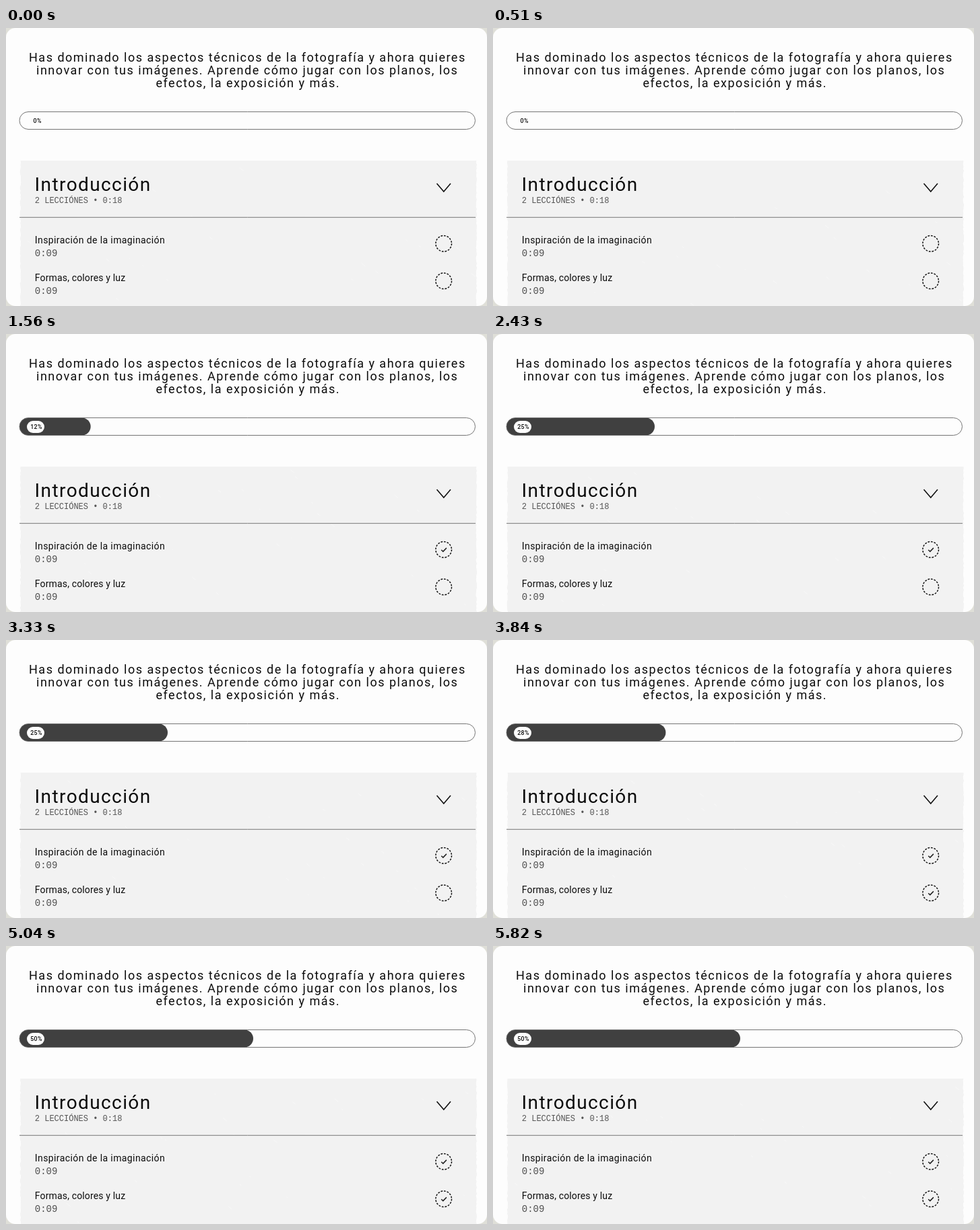
An HTML page with a canvas for the animation above (5.85 s loop, 714x413 px).

```html
<!DOCTYPE html>
<html lang="es">
<head>
<meta charset="utf-8">
<title>Progreso del curso</title>
<style>
html, body { margin: 0; width: 100%; height: 100%; overflow: hidden; background: #dfdfd8; }
canvas { display: block; width: 714px; height: 413px; }
</style>
</head>
<body>
<canvas id="stage"></canvas>
<script>
const W = 714, H = 413, LOOP = 5850;
const SANS = 'Roboto, sans-serif', MONO = '"Liberation Mono", monospace';
const BAR = { x: 20, y: 124.5, w: 676.5, h: 26, r: 13 };
const steps = [
  { check: 960, start: 1093, from: 0, to: 220 },
  { check: 3486, start: 3616, from: 220, to: 347 }
];

const canvas = document.getElementById('stage');
const ctx = canvas.getContext('2d');
const dpr = window.devicePixelRatio || 1;
canvas.width = W * dpr;
canvas.height = H * dpr;

const clamp = v => Math.max(0, Math.min(1, v));
const easeInOut = p => (1 - Math.cos(Math.PI * p)) / 2;
const easeOut = p => 1 - (1 - p) ** 2;

function random(seed) {
  let s = seed * 7919 + 17;
  return () => (s = (s * 16807) % 2147483647) / 2147483647;
}

function text(str, x, y, size, spacing = 0, family = SANS, color = '#0c0c0c', weight = 400) {
  ctx.font = `${weight} ${size}px ${family}`;
  ctx.letterSpacing = spacing + 'px';
  ctx.fillStyle = color;
  ctx.fillText(str, x, y);
}

function rounded(x, y, w, h, r) {
  ctx.beginPath();
  ctx.roundRect(x, y, w, h, r);
}

function polyline(points, width, color) {
  ctx.beginPath();
  points.forEach(([x, y]) => ctx.lineTo(x, y));
  ctx.lineWidth = width;
  ctx.strokeStyle = color;
  ctx.stroke();
}

// Paper panel with worn sides and faint flecks
function panel(t) {
  const rnd = random(1 + Math.floor(t / 90));
  ctx.fillStyle = '#f2f2f2';
  ctx.beginPath();
  ctx.moveTo(21.5, 197);
  ctx.lineTo(698.5, 197);
  for (let y = 200; y <= H + 3; y += 3) ctx.lineTo(697.5 + rnd() * 1.6, y);
  for (let y = H + 3; y >= 200; y -= 3) ctx.lineTo(20.6 + rnd() * 1.6, y);
  ctx.fill();
  for (let i = 0; i < 22; i++) {
    const x = 25 + rnd() * 668, y = 200 + rnd() * 210, len = 1 + rnd() * 5;
    polyline([[x, y], [x + len, y + len * 0.8]], 0.6, 'rgba(255,255,255,.7)');
  }
}

function progress(t) {
  let width = 0, pct = 0;
  for (const s of steps) {
    const p = easeInOut(clamp((t - s.start) / 960));
    width += (s.to - s.from) * p;
    pct += 25 * p;
  }
  ctx.save();
  rounded(BAR.x, BAR.y, BAR.w, BAR.h, BAR.r);
  ctx.clip();
  ctx.fillStyle = '#404040';
  rounded(BAR.x - 100, BAR.y, width + 100, BAR.h, BAR.r);
  ctx.fill();
  ctx.restore();

  rounded(BAR.x, BAR.y, BAR.w, BAR.h, BAR.r);
  ctx.lineWidth = 0.9;
  ctx.strokeStyle = '#666';
  ctx.stroke();

  ctx.fillStyle = '#fdfdfd';
  rounded(31, 129, 26, 18, 9);
  ctx.fill();
  const n = Math.round(pct);
  text(n + '%', n < 10 ? 40.6 : 36.2, 141.2, 8.8, 0.35, SANS, '#0c0c0c', 500);
}

function tick(y, start, t) {
  const cx = 649.7;
  ctx.setLineDash([2.8, 1.83]);
  ctx.lineWidth = 1.5;
  ctx.strokeStyle = '#111';
  ctx.beginPath();
  ctx.arc(cx, y, 11.8, 0, Math.PI * 2);
  ctx.stroke();
  ctx.setLineDash([]);

  const k = easeOut(clamp((t - start) / 240));
  if (!k) return;
  ctx.save();
  ctx.translate(cx, y);
  ctx.scale(k, k);
  polyline([[-3.5, 0.4], [-0.9, 2.8], [4.2, -2.4]], 1.5, '#222');
  ctx.restore();
}

function lesson(name, spacing, y, start, t) {
  text(name, 42.8, y, 14, spacing);
  text('0:09', 42.8, y + 19, 14, 0, MONO, '#505050');
  tick(y + 0.3, start, t);
}

function draw(t) {
  ctx.setTransform(dpr, 0, 0, dpr, 0, 0);
  ctx.fillStyle = '#dfdfd8';
  ctx.fillRect(0, 0, W, H);
  ctx.fillStyle = '#fdfdfd';
  rounded(0, 0, W, H, 14);
  ctx.fill();
  ctx.save();
  ctx.clip();

  text('Has dominado los aspectos técnicos de la fotografía y ahora quieres', 34, 50, 18, 1.5);
  text('innovar con tus imágenes. Aprende cómo jugar con los planos, los', 45, 69, 18, 1.52);
  text('efectos, la exposición y más.', 222.5, 88, 18, 1.5);
  progress(t);

  panel(t);
  text('Introducción', 42.6, 242, 28, 1.4);
  text('2 LECCIÓNES • 0:18', 42.8, 260, 12, 0, MONO, '#555');
  polyline([[639.5, 231], [649.8, 243], [660, 231]], 1.6, '#111');
  polyline([[20, 281.3], [697, 281.3]], 1, '#777');

  lesson('Inspiración de la imaginación', 0.4, 320, steps[0].check, t);
  lesson('Formas, colores y luz', 0.15, 375.5, steps[1].check, t);
  ctx.restore();
}

const begin = performance.now();
function frame() {
  draw((performance.now() - begin) % LOOP);
  requestAnimationFrame(frame);
}
frame();
</script>
</body>
</html>
```
